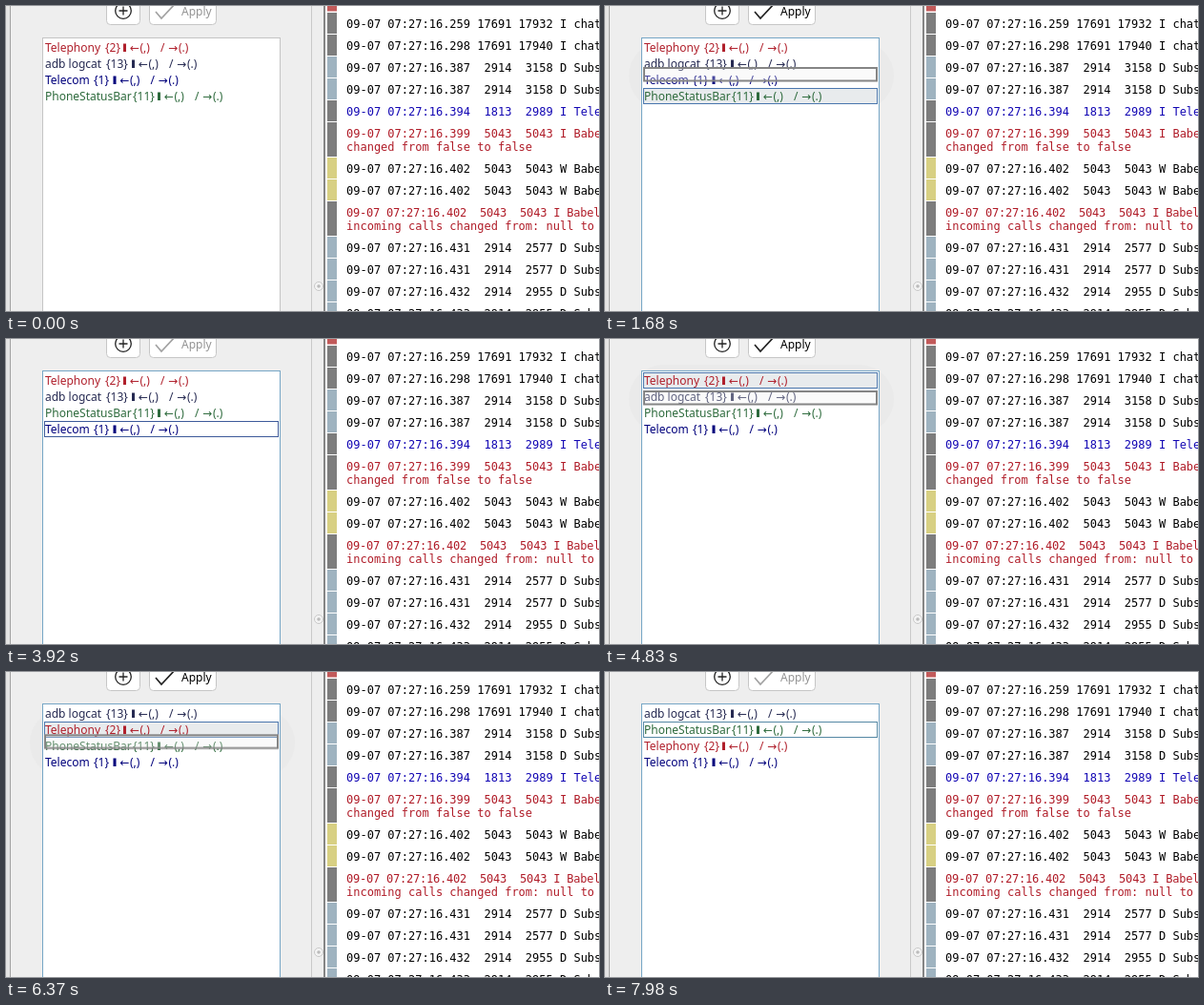
Recreate the animation shown at these times as an HTML page. Size 622 by 320 pixels, loop 8050 ms.

```html
<!DOCTYPE html>
<html lang="en">
<head>
<meta charset="utf-8">
<title>Filter list reordering</title>
<style>
html, body { margin: 0; width: 100%; height: 100%; overflow: hidden; background: #eee; }
svg { display: block; width: 622px; height: 320px; }
text { white-space: pre; }
.ui { font: 12px "Noto Sans", "Open Sans", sans-serif; }
.arrow { font: 12px "DejaVu Sans", sans-serif; }
.log { font: 12px "DejaVu Sans Mono", monospace; }

.loop { animation: 8050ms step-end infinite; }
#telephony { fill: #b0202c; animation-name: telephony; }
#adb { fill: #262a52; animation-name: adb; }
#telecom { fill: #00007c; animation-name: telecom; }
#phone { fill: #2d6a3c; animation-name: phone; }
#list { fill: #fff; stroke: #c4c4c4; animation-name: focus; }
#pick { fill: #fff; stroke: #4a76ad; animation-name: pick; }
#apply { animation-name: apply; }
#ghost, #halo { visibility: hidden; animation-name: ghost; }

/* One tick is 70 ms, 115 ticks make the loop. */
@keyframes telephony {
  0% { transform: translateY(0); }
  63.478% { transform: translateY(17px); }
  82.609%, 100% { transform: translateY(34px); }
}
@keyframes adb {
  0% { transform: translateY(17px); }
  63.478%, 100% { transform: translateY(0); }
}
@keyframes telecom {
  0% { transform: translateY(34px); }
  25.217%, 100% { transform: translateY(51px); }
}
@keyframes phone {
  0% { transform: translateY(51px); }
  25.217% { transform: translateY(34px); }
  82.609%, 100% { transform: translateY(17px); }
}
@keyframes focus {
  0% { stroke: #c4c4c4; }
  12.174%, 100% { stroke: #76a6c6; }
}
@keyframes pick {
  0% { visibility: hidden; transform: translateY(51px); }
  12.174% { visibility: visible; transform: translateY(51px); fill: #fff; stroke: #4a76ad; }
  13.913% { visibility: visible; transform: translateY(51px); fill: #e8ebed; stroke: #4a76ad; }
  25.217% { visibility: visible; transform: translateY(51px); fill: #fff; stroke: #3d5a9a; }
  52.174% { visibility: visible; transform: translateY(0); fill: #fff; stroke: #4a76ad; }
  53.913% { visibility: visible; transform: translateY(0); fill: #e8ebed; stroke: #4a76ad; }
  63.478% { visibility: visible; transform: translateY(0); fill: #fff; stroke: #4a76ad; }
  73.913% { visibility: visible; transform: translateY(17px); fill: #fff; stroke: #4a76ad; }
  75.652% { visibility: visible; transform: translateY(17px); fill: #e8ebed; stroke: #4a76ad; }
  82.609%, 100% { visibility: visible; transform: translateY(17px); fill: #fff; stroke: #5588a4; }
}
@keyframes apply {
  0%, 43.478%, 67.826%, 85.217%, 100% { opacity: .42; }
  13.913%, 53.913%, 75.652% { opacity: 1; }
}
@keyframes ghost {
  0% { visibility: hidden; transform: translateY(88px); }
  13.913% { visibility: visible; transform: translateY(88px); animation-timing-function: steps(8); }
  20.87% { visibility: visible; transform: translateY(65px); }
  25.217% { visibility: hidden; transform: translateY(65px); }
  53.913% { visibility: visible; transform: translateY(38px); animation-timing-function: steps(7); }
  60% { visibility: visible; transform: translateY(55px); }
  63.478% { visibility: hidden; transform: translateY(55px); }
  75.652% { visibility: visible; transform: translateY(55px); animation-timing-function: steps(6); }
  80.87% { visibility: visible; transform: translateY(72px); }
  82.609%, 100% { visibility: hidden; transform: translateY(72px); }
}
</style>
</head>
<body>
<svg viewBox="0 0 622 320">
  <rect width="622" height="320" fill="#eee"/>
  <rect width="4" height="320" fill="#e4e4e4"/>
  <rect x="4" width="1" height="320" fill="#a2a2a2"/>

  <rect id="halo" class="loop" x="25" y="-28" width="278" height="72" rx="36" fill="#eaeaea"/>

  <!-- buttons -->
  <g fill="#fff" stroke="#c6c6c6">
    <rect x="105.5" y="-9.5" width="35" height="29" rx="4"/>
    <rect x="150.5" y="-9.5" width="70" height="29" rx="4"/>
  </g>
  <g fill="none" stroke="#222" stroke-width="1.3">
    <circle cx="123" cy="5" r="8.3"/>
    <path d="M118.5 5h9M123 .5v9"/>
  </g>
  <g id="apply" class="loop">
    <path d="M157 6l6 7L178 -3" fill="none" stroke="#222" stroke-width="1.7"/>
    <text class="ui" x="184" y="10">Apply</text>
  </g>

  <!-- filter list -->
  <rect id="list" class="loop" x="38.5" y="33.5" width="249" height="300"/>
  <rect id="pick" class="loop" x="40.5" y="35.5" width="245" height="16"/>
  <g id="filters"></g>
  <rect id="ghost" class="loop" x="41" y="0" width="244" height="13.5" fill="#eee" fill-opacity=".3" stroke="#858585" stroke-width="2"/>

  <!-- splitter -->
  <rect x="320" width="1" height="320" fill="#c9c9c9"/>
  <rect x="333" width="2" height="320" fill="#858585"/>
  <circle cx="328" cy="294" r="4.5" fill="#f4f4f4" stroke="#c8c8c8"/>
  <circle cx="328" cy="294" r="1.8" fill="#bbb"/>

  <!-- log -->
  <rect x="335" width="287" height="320" fill="#fff"/>
  <g id="log" class="log"></g>
</svg>
<script>
const NS = "http://www.w3.org/2000/svg";

function add(parent, tag, attrs, text) {
  const el = document.createElementNS(NS, tag);
  for (const key in attrs) el.setAttribute(key, attrs[key]);
  if (text) el.textContent = text;
  return parent.appendChild(el);
}

// id, name, count, x of the count, right end of the row
const filters = [
  ["telephony", "Telephony", 2, 104, 194],
  ["adb", "adb logcat", 13, 105, 203],
  ["telecom", "Telecom", 1, 92, 183.5],
  ["phone", "PhoneStatusBar", 11, 133, 230]
];
const list = document.getElementById("filters");
for (const [id, name, count, countX, end] of filters) {
  const row = add(list, "g", { id, class: "ui loop" });
  const put = (x, text, cls = "ui") => add(row, "text", { x, y: 48, class: cls }, text);
  put(41, name);
  put(countX, `{${count}}`);
  add(row, "rect", { x: end - 71, y: 39.5, width: 3, height: 8.5 });
  put(end - 64, "←", "arrow");
  put(end - 53.5, "(,)");
  put(end - 32, "/");
  put(end - 24, "→", "arrow");
  put(end - 13, "(.)");
}

const GREY = "#7d7d7d", BLUE = "#9fb3c0", YELLOW = "#d8d083";
const RED_TEXT = "#b01c28", BLUE_TEXT = "#1408b4";

// milliseconds, process and thread, message, marker, text colour, second line
const entries = [
  ["259", "17691 17932", "I chatty", GREY],
  ["298", "17691 17940", "I chatty", GREY],
  ["387", " 2914  3158", "D SubsC", BLUE],
  ["387", " 2914  3158", "D SubsC", BLUE],
  ["394", " 1813  2989", "I Telec", GREY, BLUE_TEXT],
  ["399", " 5043  5043", "I Babel", GREY, RED_TEXT, "changed from false to false"],
  ["402", " 5043  5043", "W Babel", YELLOW],
  ["402", " 5043  5043", "W Babel", YELLOW],
  ["402", " 5043  5043", "I Babel", GREY, RED_TEXT, "incoming calls changed from: null to"],
  ["431", " 2914  2577", "D SubsC", BLUE],
  ["431", " 2914  2577", "D SubsC", BLUE],
  ["432", " 2914  2955", "D SubsC", BLUE],
  ["433", " 2914  2955", "D SubsC", BLUE]
];
const log = document.getElementById("log");
add(log, "rect", { x: 337, y: 0, width: 10, height: 5.5, fill: "#c25a5a" });
let rowY = 7;
entries.forEach(([ms, ids, msg, marker, fill = "#000", more], i) => {
  const height = more ? 37 : 23;
  add(log, "rect", { x: 337, y: rowY, width: 10, height: height - 1, fill: marker });
  const line = add(log, "text", { x: 357, y: rowY + 16, fill },
    `09-07 07:27:16.${ms} ${ids} ${msg}`);
  if (i === 8) line.style.letterSpacing = "-.22px";
  if (more) add(log, "text", { x: 357, y: rowY + 29.5, fill }, more);
  rowY += height;
});
</script>
</body>
</html>
```
